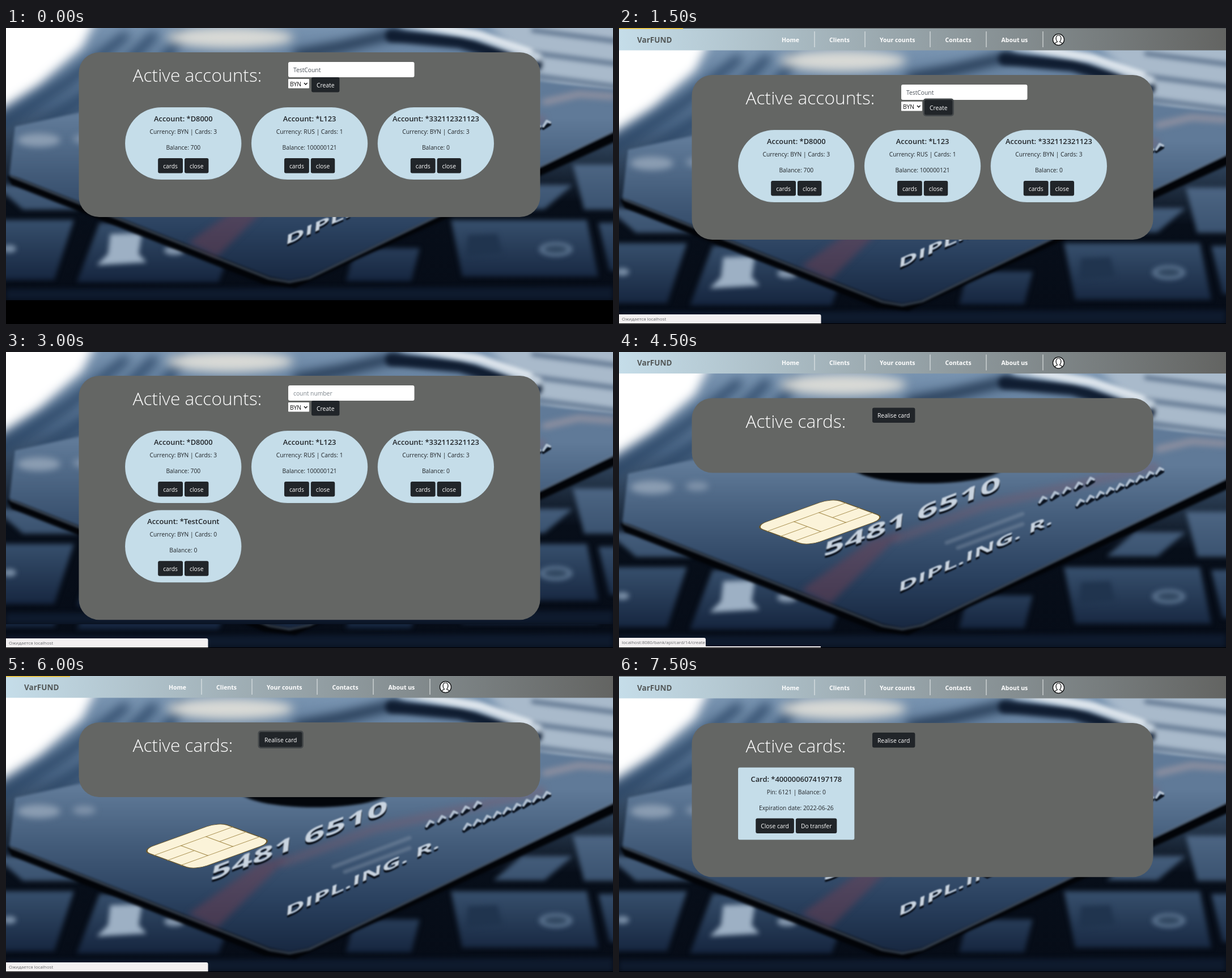
Write an HTML page with a canvas that moves like this. It is 1071 px wide and 523 px high and loops after 8 s.

```html
<!DOCTYPE html>
<html lang="en">
<head>
<meta charset="utf-8">
<title>Accounts and cards</title>
<style>
  html, body { margin: 0; width: 100%; height: 100%; overflow: hidden; background: #000; }
  canvas { display: block; }
</style>
</head>
<body>
<canvas id="stage" width="1071" height="523"></canvas>
<script>
const W = 1071, H = 523, LOOP = 8000, STEP = 1500, PHOTO_H = 522;
const FACE = '"Open Sans", "Noto Sans", sans-serif';
const GREY = '#646664', PALE = '#c5dde9', DARK = '#212529', INK = '#181a1b';
const ROW = 140.3, COLUMN = 222.8, PAD = 9;
const ctx = document.getElementById('stage').getContext('2d');

const accounts = [
  ['D8000', 'BYN', 3, 700],
  ['L123', 'RUS', 1, 100000121],
  ['332112321123', 'BYN', 3, 0],
  ['TestCount', 'BYN', 0, 0]
];

// One scene per step; top is the upper edge of the grey panel
const scenes = [
  { page: accountsPage, top: 43, tiles: 3, entry: 'TestCount' },
  { page: accountsPage, top: 83, tiles: 3, entry: 'TestCount', focus: true, status: 'wait' },
  { page: accountsPage, top: 42, tiles: 4, status: 'wait' },
  { page: cardsPage, top: 81.5, tiles: 0, status: 'link' },
  { page: cardsPage, top: 82, tiles: 0, focus: true, status: 'wait' },
  { page: cardsPage, top: 83, tiles: 1 }
];

function paintPhoto() {
  const canvas = document.createElement('canvas');
  canvas.width = W;
  canvas.height = PHOTO_H;
  const c = canvas.getContext('2d');
  c.lineCap = c.lineJoin = 'round';

  const soften = px => { c.filter = px ? `blur(${px}px)` : 'none'; };
  const path = pts => {
    c.beginPath();
    for (let i = 0; i < pts.length; i += 2) c.lineTo(pts[i], pts[i + 1]);
  };
  const shape = (color, ...pts) => {
    path(pts);
    c.fillStyle = color;
    c.fill();
  };
  const line = (color, width, ...pts) => {
    path(pts);
    c.strokeStyle = color;
    c.lineWidth = width;
    c.stroke();
  };
  const oval = (color, x, y, rx, ry) => {
    c.beginPath();
    c.ellipse(x, y, rx, ry, 0, 0, 7);
    c.fillStyle = color;
    c.fill();
  };
  const ramp = (top, bottom, ...colors) => {
    const g = c.createLinearGradient(0, top, 0, bottom);
    colors.forEach((color, i) => g.addColorStop(i / (colors.length - 1), color));
    return g;
  };

  c.fillStyle = ramp(0, PHOTO_H, '#86a1bd', '#486484', '#070e19', '#060c17');
  c.fillRect(0, 0, W, PHOTO_H);

  // far keys, light and pen
  soften(9);
  shape('#fff', -40, -40, 190, -40, 135, 75, 60, 140, -40, 205);
  for (let i = 0; i < 3; i++) line('#2b4666', 14, i * 70 - 10, 215, 110 + i * 70, 135, 210 + i * 50, 55);
  oval('#d9dad6', 395, 58, 112, 19);
  line('#20354f', 18, 515, 88, 590, 74, 690, 50);
  shape('#a9bacb', 840, 20, W + 20, 20, W + 20, 190, 930, 130);
  soften(4);
  for (let i = 0; i < 3; i++) line('#566c87', 7, 930, 45 + i * 40, W + 10, 65 + i * 40);
  line('#101d31', 22, 680, 55, 800, 66, 935, 106);
  line('#c3d0dc', 17, 700, 30, 830, 52, 937, 92);
  line('#fbfdff', 5, 730, 34, 840, 54, 925, 82);

  // near keys share one light
  const keyLight = ramp(280, 500, '#4d6684', '#344c69', '#12213a');
  const key = (x, y, w, h, lean) => shape(keyLight, x, y, x + w, y, x + w + lean, y + h, x + lean, y + h);
  soften(4);
  key(-20, 318, 100, 44, 50);
  key(-20, 380, 140, 106, -35);
  key(165, 385, 250, 105, -40);
  key(615, 430, 115, 58, -15);
  key(910, 318, 90, 43, -50);
  key(1000, 282, 90, 80, 20);
  key(785, 380, 240, 100, 20);
  key(1045, 385, 60, 85, 20);
  shape('#0e1a2d', 0, 502, W, 498, W, PHOTO_H, 0, PHOTO_H);
  shape('#9db0c4', 184, 405, 240, 403, 234, 440, 248, 455, 160, 460, 180, 440);
  shape('#20344e', 815, 407, 867, 405, 876, 440, 812, 446);
  oval('#8598ae', 297, 434, 18, 8);
  oval('#778ca4', 6, 431, 12, 7);
  oval('#58708c', 970, 432, 30, 13);
  oval('#30465f', 970, 432, 20, 7);

  // bank card
  soften(2);
  shape('#020408', 2, 303, 10, 318, 455, 494, 510, 500, W + 10, 239, W + 10, 215);
  shape(ramp(200, 490, '#607a98', '#435c7a', '#2b4260', '#172740'),
    6, 300, 16, 215, 500, 110, 930, 135, W + 10, 150, W + 10, 220, 535, 481, 500, 488, 465, 481);
  line('#8196ae', 1.5, 8, 303, 465, 484, 500, 490, 535, 483, W, 224);
  oval('#03060b', 545, 203, 132, 29);
  soften(6);
  oval('#8b9db2', 58, 239, 38, 12);
  oval('#8093aa', 138, 237, 20, 8);
  line('#9a96a2', 9, 950, 172, 1010, 158, W, 162);
  line('rgba(130,90,108,.35)', 16, 490, 330, 650, 270, 945, 203);
  shape('rgba(118,66,82,.45)', 322, 420, 445, 332, 500, 318, 372, 445);

  // chip, drawn as a tilted square
  soften(0);
  c.setTransform(1.38, -0.5, 0.95, 0.35, 238, 308);
  c.beginPath();
  c.roundRect(0, 0, 100, 100, 16);
  c.fillStyle = '#fbf3d9';
  c.fill();
  c.strokeStyle = '#6b5a30';
  c.lineWidth = 1.6;
  c.stroke();
  for (let i = 1; i < 4; i++) {
    line('#a58c4c', 1.3, 0, i * 25, 34, i * 25);
    line('#a58c4c', 1.3, 66, i * 25, 100, i * 25);
  }
  c.strokeRect(34, 25, 32, 50);
  c.resetTransform();

  // raised lettering
  const emboss = (text, size, x, y, stretch, climb) => {
    c.font = `700 ${size}px ${FACE}`;
    [['#060b14', 4], ['#c9d4e0', 0]].forEach(([color, drop]) => {
      c.setTransform(stretch, -climb, -0.1, 0.95, x, y + drop);
      c.fillStyle = color;
      c.fillText(text, 0, 0);
    });
    c.resetTransform();
  };
  const marks = (n, x, y, dx) => {
    for (let i = 0; i < n; i++) {
      const px = x + i * dx, py = y - i * dx * 0.4;
      line('#0a121e', 6, px, py + 3, px + 11, py - 4);
      line('#b4c2d2', 4, px, py, px + 6, py - 10, px + 12, py - 7);
    }
  };
  soften(0.8);
  emboss('5481 6510', 36, 360, 362, 1.8, 0.69);
  emboss('DIPL.ING. R.', 25, 492, 425, 1.85, 0.83);
  marks(5, 742, 266, 21);
  marks(9, 808, 271, 17.5);
  soften(2);
  for (let i = 0; i < 2; i++) line('rgba(160,172,190,.3)', 7, 578 + i * 20, 337 + i * 9, 712, 286 + i * 18);
  return canvas;
}

const photo = paintPhoto();

function box(x, y, w, h, r, fill) {
  ctx.beginPath();
  ctx.roundRect(x, y, w, h, r);
  ctx.fillStyle = fill;
  ctx.fill();
}

function outline(color, width) {
  ctx.strokeStyle = color;
  ctx.lineWidth = width;
  ctx.stroke();
}

// Draws text and returns its width
function label(text, x, y, { size = 10.3, color = DARK, weight = 400, align = 'left' } = {}) {
  ctx.font = `${weight} ${size}px ${FACE}`;
  ctx.textAlign = align;
  ctx.fillStyle = color;
  ctx.fillText(text, x, y);
  return ctx.measureText(text).width;
}

function buttonWidth(text) {
  ctx.font = `400 10.3px ${FACE}`;
  return ctx.measureText(text).width + 2 * PAD;
}

function button(text, x, y, focus) {
  const w = buttonWidth(text);
  if (focus) box(x - 2.5, y - 2.5, w + 5, 31.5, 5, '#44484a');
  box(x, y, w, 26.5, 3, DARK);
  label(text, x + PAD, y + 17.5, { color: '#fff' });
  return w;
}

function tile(i, top, radius, [title, ...lines], buttons) {
  const x = 210 + (i % 3) * COLUMN, y = top + Math.floor(i / 3) * ROW;
  const mid = x + 102.8, gap = 3;
  box(x, y, 205.5, 128, radius, PALE);
  outline('rgba(0,0,0,.125)', 1);
  label(title, mid, y + 25, { size: 12.9, weight: 600, align: 'center' });
  lines.forEach((text, n) => label(text, mid, y + 47 + n * 28, { align: 'center' }));
  const total = buttons.reduce((sum, text) => sum + buttonWidth(text) + gap, -gap);
  let left = mid - total / 2;
  for (const text of buttons) left += button(text, left, y + 90) + gap;
}

function menu(top, loading) {
  const mid = top - 62.5, bottom = top - 43.5, gap = 26.5;
  const shade = ctx.createLinearGradient(0, 0, W, 0);
  shade.addColorStop(0, PALE);
  shade.addColorStop(1, '#636462');
  box(0, 0, W, bottom, 0, shade);
  if (top > 82.5) box(0, 0, W, 1, 0, '#55595a');
  if (loading) box(0, 0, 113, 1.5, 0, '#f2bd1d');
  label('VarFUND', 32, mid + 5, { size: 13.5, color: '#535858', weight: 700 });
  let x = 287;
  for (const text of ['Home', 'Clients', 'Your counts', 'Contacts', 'About us']) {
    x += label(text, x, mid + 4, { size: 10.5, color: '#fff', weight: 700 }) + gap;
    box(Math.round(x) - 0.5, mid - 14.5, 1, 28, 0, '#e9eded');
    x += gap;
  }
  profile(775.5, mid);
}

function profile(x, y) {
  box(x - 10, y - 10, 20, 20, 10, '#fff');
  outline(INK, 1.5);
  for (const side of [-1, 1]) {
    ctx.beginPath();
    ctx.moveTo(x + side * 6.5, y + 7);
    ctx.quadraticCurveTo(x + side * 5.5, y + 5, x + side * 2, y + 4);
    ctx.bezierCurveTo(x + side * 6, y - 1, x + side * 5, y - 7.5, x, y - 7.5);
    outline(INK, 1.2);
  }
}

function heading(text, top) {
  label(text, 223.5, top + 52, { size: 31.7, color: '#fff', weight: 300 });
}

function accountsPage({ top, entry, focus, tiles }) {
  heading('Active accounts:', top);
  box(498, top + 17, 222.5, 27, 3, '#fff');
  label(entry || 'count number', 507, top + 35, { color: entry ? '#495057' : '#7b838a' });
  box(498, top + 47, 37, 16.5, 1, '#fff');
  label('BYN', 501, top + 60, { color: '#111' });
  ctx.beginPath();
  for (const dx of [-1, 0, 1]) ctx.lineTo(528.8 + dx * 2.8, top + 57 - Math.abs(dx) * 3);
  outline('#111', 1.4);
  button('Create', 539, top + 44, focus);
  accounts.slice(0, tiles).forEach(([name, currency, cards, balance], i) =>
    tile(i, top + 97, 64,
      [`Account: *${name}`, `Currency: ${currency} | Cards: ${cards}`, `Balance: ${balance}`],
      ['cards', 'close']));
}

function cardsPage({ top, focus, tiles }) {
  heading('Active cards:', top);
  button('Realise card', 447, top + 17, focus);
  if (tiles) {
    tile(0, top + 78.5, 3,
      ['Card: *4000006074197178', 'Pin: 6121 | Balance: 0', 'Expiration date: 2022-06-26'],
      ['Close card', 'Do transfer']);
  }
}

function statusBar(kind) {
  const link = kind === 'link', fill = '#f3f0f1', y = link ? 505 : 506;
  if (link) box(0, 520, 356, 2, 0, fill);
  box(0, y, link ? 153 : 356.5, 522 - y, [0, 3, 0, 0], fill);
  label(link ? 'localhost:8080/bank/api/card/14/create' : 'Ожидается localhost',
    5, y + 11, { size: 8, color: '#66686b' });
}

function draw(scene) {
  const { page, top, tiles, focus, status } = scene;
  const scrolled = top < 50;
  const base = page === cardsPage ? 132 : 150.7;
  box(0, 0, W, H, 0, '#000');
  if (scrolled && status) ctx.drawImage(photo, 0, 0);
  ctx.drawImage(photo, 0, scrolled ? -41 : 0);
  box(128.5, top, 814, base + Math.ceil(tiles / 3) * ROW, 36, GREY);
  if (!scrolled) menu(top, focus);
  page(scene);
  if (status) statusBar(status);
}

let shown = null;

function tick() {
  const scene = scenes[Math.floor(performance.now() % LOOP / STEP)];
  if (scene !== shown) draw(shown = scene);
  requestAnimationFrame(tick);
}
tick();
</script>
</body>
</html>
```
